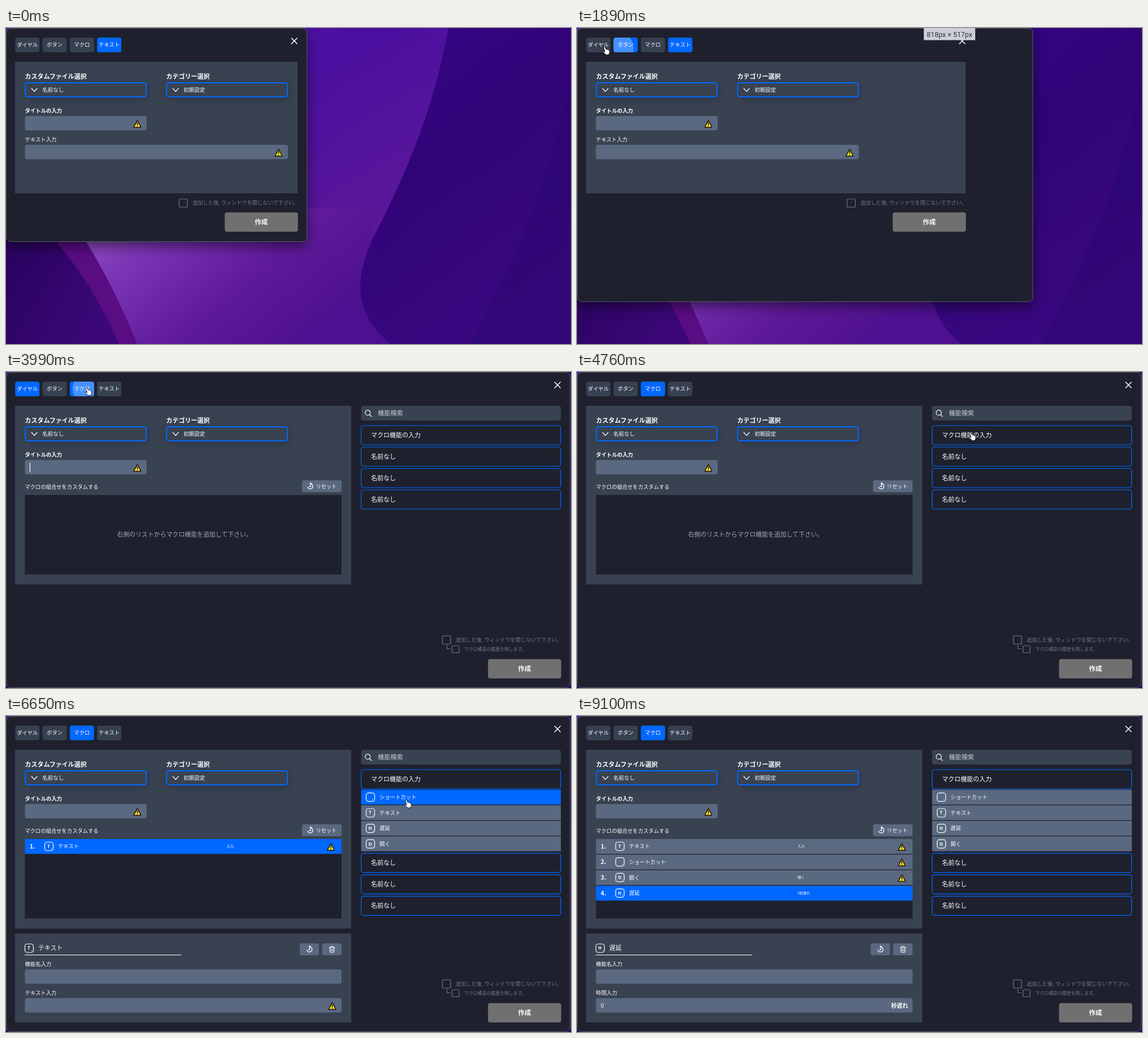
Animation of 1000 by 560 pixels, one loop 9170 ms. Source, as an HTML page:

```html
<!DOCTYPE html>
<html lang="ja">
<head>
<meta charset="utf-8">
<title>Macro editor</title>
<style>
html, body { margin: 0; width: 100%; height: 100%; overflow: hidden; background: #1e212d; }
svg { display: block; width: 1000px; height: 560px; font-family: "Noto Sans CJK JP", "Noto Sans CJK", "Noto Sans", sans-serif; }
text { white-space: pre; }
.shade { filter: drop-shadow(0 8px 11px rgba(0, 0, 0, .5)); }
.soft { filter: drop-shadow(2px 3px 5px rgba(20, 25, 40, .3)); }
.key { font-family: Inter, Roboto, sans-serif; }
</style>
</head>
<body>
<svg id="stage" viewBox="0 0 1000 560" xmlns="http://www.w3.org/2000/svg"></svg>
<script>
const LOOP = 9170, SCALE = .8613;
const BLUE = '#0068ff', DARK = '#1e212d', PANEL = '#394251', FIELD = '#5a6980', TAB = '#374050';
const stage = document.getElementById('stage');

const rect = (x, y, w, h, fill, r = 0, more = '') =>
  `<rect x="${x}" y="${y}" width="${w}" height="${h}" rx="${r}" fill="${fill}" ${more}/>`;
const text = (x, y, size, str, weight = 500, fill = '#fff', more = '') =>
  `<text x="${x}" y="${y + size * .37}" font-size="${size}" font-weight="${weight}" fill="${fill}" ${more}>${str}</text>`;
const mid = 'text-anchor="middle"';
const line = (d, color = '#fff', w = 1.2, more = '') =>
  `<path d="${d}" fill="none" stroke="${color}" stroke-width="${w}" stroke-linecap="round" stroke-linejoin="round" ${more}/>`;
const at = (x, y, body) => `<g transform="translate(${x} ${y})">${body}</g>`;
const group = (id, body, more = '') => `<g id="${id}" ${more}>${body}</g>`;

const warn = (x, y) => at(x, y,
  `<path d="M0 -6.2L6.4 6H-6.4Z" fill="#ffe01e" stroke="#161616" stroke-width="1.5" stroke-linejoin="round"/>` +
  line('M0 -2.2V1.8M0 3.9V4', '#161616', 1.5));
const field = (y, w, alert) => rect(33.5, y, w, 25.5, FIELD, 4) + (alert ? warn(w + 17, y + 14) : '');
const select = (x, str) =>
  rect(x, 97, 214, 25, PANEL, 4, `stroke="${BLUE}" stroke-width="2" class="soft"`) +
  line(`M${x + 11} 107l5 5.5l5 -5.5`) + text(x + 30, 109.5, 9.5, str);
const badge = (x, y, letter) =>
  rect(x - 7.5, y - 7.5, 15, 15, 'none', 4, 'stroke="#fff" stroke-width="1.2"') +
  text(x - .5, y, 8, letter, 700, '#fff', mid) + `<circle cx="${x + 4.6}" cy="${y + 4.4}" r=".7" fill="#fff"/>`;
const redo = (x, y) => at(x, y, line('M0 -4.6A4.6 4.6 0 1 1 -4.4 1.2M1.4 -6.4L-.6 -4.6L1.4 -2.8', '#fff', 1.3) +
  '<circle r="1.5" fill="#fff"/>');
const box = (x, y, s) => rect(x, y, s, s, 'none', 2, 'stroke="#6d727d" stroke-width="1.2"');

// Wallpaper
const stop = (o, c) => `<stop offset="${o}" stop-color="${c}"/>`;
const grad = (id, x2, y2, ...cs) => `<linearGradient id="${id}" x1="0" y1="0" x2="${x2}" y2="${y2}">` +
  cs.map((c, i) => stop(i / (cs.length - 1), c)).join('') + '</linearGradient>';
const wallpaper =
  rect(0, 0, 1000, 560, 'url(#sky)') +
  '<path d="M783 0C760 130 715 250 640 390C600 460 570 510 545 560H1000V0Z" fill="url(#night)"/>' +
  '<path d="M1000 90C965 260 900 420 820 560H1000Z" fill="#26056a" opacity=".4"/>' +
  '<path d="M100 320C150 380 195 470 232 560H680C610 500 620 440 650 370V320Z" fill="url(#glow)"/>' +
  '<path d="M60 330C130 400 170 470 203 560H232C195 470 160 400 110 340Z" fill="#590d83"/>' +
  '<path d="M0 330H50C120 400 165 470 200 560H0Z" fill="url(#deep)"/>' +
  '<path d="M90 380C140 440 175 500 200 560H231C205 490 170 430 134 380Z" fill="#590d83"/>';

// Keyboard
const PITCH = 36.2, TOP = 242;
const glyphs = {
  eject: 'M-6 2L0 -4.5L6 2ZM-6 5H6',
  back: 'M-8.5 0L-4 -5H8V5H-4ZM-1 -2.3L4 2.3M4 -2.3L-1 2.3',
  fwd: 'M8.5 0L4 -5H-8V5H4ZM1 -2.3L-4 2.3M-4 -2.3L1 2.3',
  tab: 'M-9 0H6M3 -2.5L6 0L3 2.5M9 -2V2',
  enter: 'M8 -5V2H-8M-5 -1L-8 2L-5 5',
  shift: 'M0 -6.5L9 1H4.5V6H-4.5V1H-9Z',
  up: 'M0 7V-7M-3 -3L0 -7L3 -3', down: 'M0 -7V7M-3 3L0 7L3 3',
  home: 'M0 8V-5M-3 -1L0 -5L3 -1M-3 -8H3', end: 'M0 -8V5M-3 1L0 5L3 1M-3 8H3',
  clear: 'M-6.5 -6H6.5V6H-6.5ZM-3 -3L3 3M3 -3L-3 3', pad: 'M-4 4L0 -1L4 4M-4.5 -4H4.5'
};
const grey = ['eject', 'fn', 'clear'];
function key(label, x, row, w = PITCH, rows = 1) {
  const y = TOP + row * PITCH, kw = w - 1.7, kh = rows * PITCH - 1.7, cx = x + kw / 2, cy = y + kh / 2 - .5;
  const cap = rect(x, y, kw, kh, grey.includes(label) ? '#a9aeb8' : '#fff', 4, 'stroke="#b4b9c6" stroke-width="1.2"');
  const size = label.length > 3 ? 9.7 : 10.4;
  return cap + (glyphs[label] ? at(cx, cy, line(glyphs[label], '#111', 1.1))
    : text(cx, cy, size, label, 400, '#111', mid + (label === '한/영' ? '' : ' class="key"')));
}
function keyRow(row, x, labels, first = PITCH, right = 0) {
  const list = labels.split(' ');
  return list.map((label, i) => {
    const kx = i ? x + first + (i - 1) * PITCH : x;
    const w = i === 0 ? first : right && i === list.length - 1 ? right - kx : PITCH;
    return key(label, kx, row, w);
  }).join('');
}
const R = 558, M = 573.7, N = 697.7;
const keyboard =
  keyRow(0, 33.8, 'esc F1 F2 F3 F4 F5 F6 F7 F8 F9 F10 F11 F12 eject', 53.5, R) +
  keyRow(1, 33.8, '~ 1 2 3 4 5 6 7 8 9 0 − = back', PITCH, R) +
  keyRow(2, 33.8, 'tab Q W E R T Y U I O P [ ] \\', 53.5, R) +
  keyRow(3, 33.8, "한/영 A S D F G H J K L ; ' enter", 71.8, R) +
  keyRow(4, 33.8, 'shift Z X C V B N M , . / shift', 89.5, R) +
  ['control', 'option', 'command'].map((k, i) =>
    key(k, 33.8 + i * 53.7, 5, 53.5) + key(k, 504.5 - i * 53.7, 5, 53.5)).join('') +
  rect(194.9, TOP + 5 * PITCH, 200.5, PITCH - 1.7, '#fff', 4, 'stroke="#b4b9c6" stroke-width="1.2"') +
  keyRow(0, M, 'F13 F14 F15') + keyRow(1, M, 'fn home up') + keyRow(2, M, 'fwd end down') +
  key('▲', M + PITCH, 4) + keyRow(5, M, '◀ ▼ ▶') +
  keyRow(0, N, 'F16 F17 F18 F19') + keyRow(1, N, 'clear = / *') + keyRow(2, N, '7 8 9 −') +
  keyRow(3, N, '4 5 6 +') + keyRow(4, N, '1 2 3') +
  key('0', N, 5, 2 * PITCH) + key('.', N + 2 * PITCH, 5) + key('pad', N + 3 * PITCH, 4, PITCH, 2);

// Tabs
const tabs = ['ダイヤル', 'ボタン', 'マクロ', 'テキスト'].map((name, i) => ({
  name, x: 16.3 + 48.3 * i,
  on: [[2900, 4400], [1600, 3300], [3700, LOOP], [0, 2900]][i],
  click: [[2900, 43, 36], [1600, 72, 36], [3700, 146, 30]][i]
}));
const tabBar = tabs.map((b, i) =>
  `<clipPath id="tc${i}">${rect(b.x, 17, 43, 26, '#000', 4)}</clipPath>` +
  rect(b.x, 17, 43, 26, TAB, 4, `id="tab${i}"`) +
  `<g clip-path="url(#tc${i})"><circle id="rip${i}" fill="#fff"/></g>` +
  text(b.x + 21.5, 30, 9.4, b.name, 500, '#fff', mid)).join('');

// Macro list and rows
const kinds = {
  cut: { name: 'ショートカット', letter: '', desc: '', alert: 1 },
  txt: { name: 'テキスト', letter: 'T', desc: '入力', alert: 1 },
  wait: { name: '遅延', letter: 'H', desc: '0秒遅れ', alert: 0 },
  open: { name: '開く', letter: 'O', desc: '開く', alert: 1 }
};
const order = ['cut', 'txt', 'wait', 'open'];
const added = [['txt', 6300], ['cut', 6960], ['open', 8000], ['wait', 8550]];
const STEP = 27.6;
const item = (y, str) => rect(628.6, y, 353, 34, DARK, 4, `stroke="${BLUE}" stroke-width="1.2"`) +
  text(646, y + 16.5, 11, str);
const sub = order.map((k, i) => {
  const y = 130.6 + i * STEP;
  return rect(628.5, y, 353.5, 26.3, FIELD, 0, `id="sub${i}"`) + badge(645, y + 13.3, kinds[k].letter) +
    text(661, y + 13.2, 9.4, kinds[k].name);
}).join('');
const rows = added.map(([k], i) => {
  const y = 218 + i * STEP, o = kinds[k];
  return group('row' + i, rect(33.5, y, 560.5, 26.3, FIELD, 0, `id="bar${i}"`) +
    text(42, y + 13, 10.5, i + 1 + '.', 700) + badge(76, y + 13, o.letter) + text(92, y + 13, 9.4, o.name) +
    text(390.5, y + 12.7, 6.2, o.desc) + (o.alert ? warn(575, y + 14) : ''));
}).join('');
const forms = {
  txt: text(33.5, 491, 9.4, 'テキスト入力') + field(500, 560.5, 1),
  cut: text(33.5, 491, 9.4, 'キーの入力') + field(500, 215.5, 1),
  open: text(33.5, 491, 9.4, 'パスの入力') + field(500, 560.5, 1),
  wait: text(33.5, 491, 9.4, '時間入力') + field(500, 560.5) + text(42, 513, 10, '0') + text(556, 513, 10, '秒遅れ', 700)
};
const detail = rect(16, 385.5, 595, 157.5, PANEL) +
  line('M33.5 423.5H309.5', '#fff', 1.2) +
  rect(520, 403, 34, 21, FIELD, 3) + redo(537, 413.5) + rect(559.5, 403, 34.5, 21, FIELD, 3) +
  at(577, 413.5, line('M-5 -3.2H5M-2 -3.2V-5H2V-3.2M-3.8 -3.2L-3.4 5.2H3.4L3.8 -3.2M-1.3 -.6V2.8M1.3 -.6V2.8', '#fff', 1.1)) +
  text(33.5, 440, 9.4, '機能名入力') + field(449, 560.5) +
  added.map(([k], i) => group('form' + i, badge(41, 411.5, kinds[k].letter) +
    text(57, 411, 10.9, kinds[k].name) + forms[k])).join('');

const macroView =
  text(33.5, 204, 9.3, 'マクロの組合せをカスタムする') +
  rect(524, 192, 70, 21, FIELD, 3) + redo(538.5, 202.5) + text(548.5, 202.5, 9.2, 'リセット') +
  rect(33.5, 218, 560.5, 141, DARK) +
  group('hint', text(196.5, 288, 10.9, '右側のリストからマクロ機能を追加して下さい。', 400, '#a2a6ae')) +
  rows + group('detail', detail) +
  rect(628.5, 60, 353.5, 26, PANEL, 4) + line('M643.8 75.8L647 79M644.8 72.2A4.5 4.5 0 1 1 635.8 72.2A4.5 4.5 0 1 1 644.8 72.2') +
  text(658, 73, 11.2, '機能検索', 400, '#c9cdd5') +
  `<clipPath id="fold"><rect id="foldBox" x="620" y="129" width="370" height="0"/></clipPath>` +
  item(95, 'マクロ機能の入力') + `<g clip-path="url(#fold)">${sub}</g>` +
  group('rest', [133, 171, 209].map(y => item(y, '名前なし')).join('')) +
  line('M780.5 484V490.5H786.5', '#6d727d', 1.2) + box(789.5, 485, 12.5) +
  text(811, 491, 7.9, 'マクロ構造の履歴を残します。', 400, '#747984');

stage.innerHTML =
  '<defs>' + grad('sky', 1, 1, '#5614b4', '#4b0f9f', '#5c1899', '#43108f') +
  grad('night', .6, 1, '#38068a', '#300478', '#3a0880') +
  grad('glow', 1, .5, '#9a5cc4', '#7a34b4', '#5e1a98', '#4d1090') + grad('deep', 1, .6, '#26025c', '#3c0878') + '</defs>' +
  wallpaper +
  rect(.5, .5, 533, 378, DARK, 8, 'id="win" class="shade" stroke="#5b5e68" stroke-width="1"') +
  rect(16, 60, 500, 233, PANEL, 0, 'id="panel"') + tabBar +
  group('close', line('M-5 -5L5 5M5 -5L-5 5', '#fff', 1.5)) +
  text(33.5, 86, 11, 'カスタムファイル選択', 700) + select(34.2, '名前なし') +
  text(283.5, 86, 11, 'カテゴリー選択', 700) + select(284.2, '初期設定') +
  text(33.5, 147, 9.4, 'タイトルの入力', 700) + field(156, 215.5, 1) +
  line('M42.5 161.5V177', '#fff', 1.2, 'id="caret"') +
  group('textView', text(33.5, 198, 9.4, 'テキスト入力') + field(207, 465.5, 1)) +
  group('keyView', text(33.5, 198, 9.4, 'キーの入力') + field(207, 215.5, 1) + keyboard +
    rect(706, 508.7, 129, 34.3, TAB, 4) + text(770.5, 525.5, 11.5, 'キーボードモードの解除', 700, '#fff', mid)) +
  group('macroView', macroView) +
  group('keep', box(306.3, 303, 14.5) + text(330, 310, 9.2, '追加した後, ウィンドウを閉じないで下さい。', 400, '#747984')) +
  group('make', rect(387, 326.8, 129.5, 34.3, '#707070', 4) + text(451.7, 344, 11.5, '作成', 700, '#fff', mid)) +
  group('size', rect(0, 0, 91, 21.5, '#cdd0d8', 0, 'id="sizeBox"') +
    text(45, 11, 12.4, '', 400, '#30323a', mid + ' id="sizeText" font-family="Roboto, sans-serif"')) +
  group('tip', rect(-18.5, 0, 37, 25, '#5b5d61', 4) + text(0, 12.5, 8, '', 500, '#fff', mid + ' id="tipText"')) +
  group('cursor',
    '<path id="hand" d="M-4 -6.5c.9-.4 1.8 0 2.1 1l1.2 3.2c1-.5 1.7 0 2 .5c.8-.4 1.6 0 1.9.7c1-.2 1.7.3 1.9 1.2l.6 2c.3 1.4-.2 2.3-.7 3.2l.2 1.3-5.3 1.4-.7-1.2c-1.4-.6-2.8-2-4.2-3.6c-.7-.9.3-2.1 1.7-1.3l.9.6-2.3-7.2c-.2-.8.1-1.5.7-1.8z" fill="#fff" stroke="#111" stroke-width="1"/>' +
    '<path id="arrow" d="M-4 -7V5.5L-1.2 3L.7 7.2L2.8 6.3L1 2.2H4.8Z" fill="#111" stroke="#fff" stroke-width="1"/>');

const el = {};
stage.querySelectorAll('[id]').forEach(n => el[n.id] = n);
const set = (id, attrs) => { for (const k in attrs) el[id].setAttribute(k, attrs[k]); };
const show = (id, on) => set(id, { display: on ? 'inline' : 'none' });
const move = (id, x, y, more = '') => set(id, { transform: `translate(${x} ${y})${more}` });
const clamp = v => Math.max(0, Math.min(1, v));
const ease = v => (1 - Math.cos(Math.PI * clamp(v))) / 2;
const between = (t, a, b) => t >= a && t < b;

// Pointer stops: time, x, y
const path = [[210, 300, 450], [630, 190, 250], [840, 190, 250], [1400, 72, 40], [1640, 72, 40], [1890, 52, 40],
  [2380, 43, 40], [3300, 43, 40], [3650, 146, 34], [4150, 146, 34], [4760, 700, 114], [4980, 700, 114],
  [5500, 710, 187], [6380, 710, 187], [6750, 712, 149], [7200, 712, 149], [7500, 717, 226], [8080, 717, 226],
  [8400, 715, 203], [8620, 715, 203], [8860, 725, 400]];
function pointer(t) {
  const i = path.findIndex(p => p[0] > t);
  if (i < 1) return null;
  const [a, b] = [path[i - 1], path[i]], k = ease((t - a[0]) / (b[0] - a[0]));
  return [a[1] + (b[1] - a[1]) * k, a[2] + (b[2] - a[2]) * k];
}
const grow = t => ease((t - 1635) / 460);
const sizeAt = t => [619 + 541 * grow(t), 440 + 210 * grow(t)];
const tips = [[5690, 6400, '入力', 805, 197], [7585, 8100, '開く', 804.5, 251.5]];

function update(t) {
  // The content follows the window frame slightly late.
  const [w, h] = sizeAt(t), [cw, ch] = sizeAt(t - 65), W = cw * SCALE, dx = W - 533;
  const view = t < 2170 ? 0 : t < 3860 ? 1 : 2;
  set('win', { width: w * SCALE - 1, height: h * SCALE - 1 });
  set('panel', { width: view === 2 ? 595 : W - 33, height: [233, 414.5, 316.5][view] });
  move('close', W - 23, 23);
  ['textView', 'keyView', 'macroView'].forEach((id, i) => show(id, i === view));
  move('keep', dx, [0, 182, 164.5][view]);
  move('make', dx, view ? 182 : 0);

  const label = `${Math.round(cw)}px × ${Math.round(ch)}px`, sw = 7 * label.length;
  show('size', between(t, 1640, 2870));
  move('size', W - sw, 0);
  set('sizeBox', { width: sw });
  set('sizeText', { x: sw / 2 });
  el.sizeText.textContent = label;

  show('caret', between(t, 2350, 2870) || between(t, 3390, 4420));

  tabs.forEach((b, i) => {
    set('tab' + i, { fill: between(t, b.on[0], b.on[1]) ? BLUE : TAB });
    const d = b.click ? t - b.click[0] : -1;
    show('rip' + i, between(d, 0, 700));
    if (d >= 0) set('rip' + i, { cx: b.click[1], cy: b.click[2], r: d * .097, opacity: .28 * (1 - clamp((d - 350) / 350)) });
  });

  const p = pointer(t);
  show('cursor', !!p);
  if (p) {
    move('cursor', p[0], p[1]);
    const hand = p[1] < 48 && p[0] < 206 || p[0] > 628 && p[1] < 245;
    show('hand', hand);
    show('arrow', !hand);
  }

  const open = ease((t - 4950) / 200);
  set('foldBox', { height: open * 111.5 });
  move('rest', 0, open * 110.3);
  const over = p && open === 1 && p[0] > 628 ? Math.floor((p[1] - 6 - 130.6) / STEP) : -1;
  order.forEach((_, i) => set('sub' + i, { fill: i === over ? BLUE : FIELD }));

  const count = added.filter(a => t >= a[1]).length;
  show('hint', !count);
  show('detail', count);
  added.forEach((_, i) => {
    show('row' + i, i < count);
    show('form' + i, i === count - 1);
    set('bar' + i, { fill: i === count - 1 ? BLUE : FIELD });
  });

  const tip = tips.find(a => between(t, a[0], a[1]));
  show('tip', tip);
  if (tip) {
    const k = clamp((t - tip[0]) / 120);
    move('tip', tip[3], tip[4], ` scale(${.82 + .18 * k})`);
    set('tip', { opacity: .9 * k });
    el.tipText.textContent = tip[2];
  }
}

const start = performance.now();
function frame() {
  update((performance.now() - start) % LOOP);
  requestAnimationFrame(frame);
}
frame();
</script>
</body>
</html>
```
